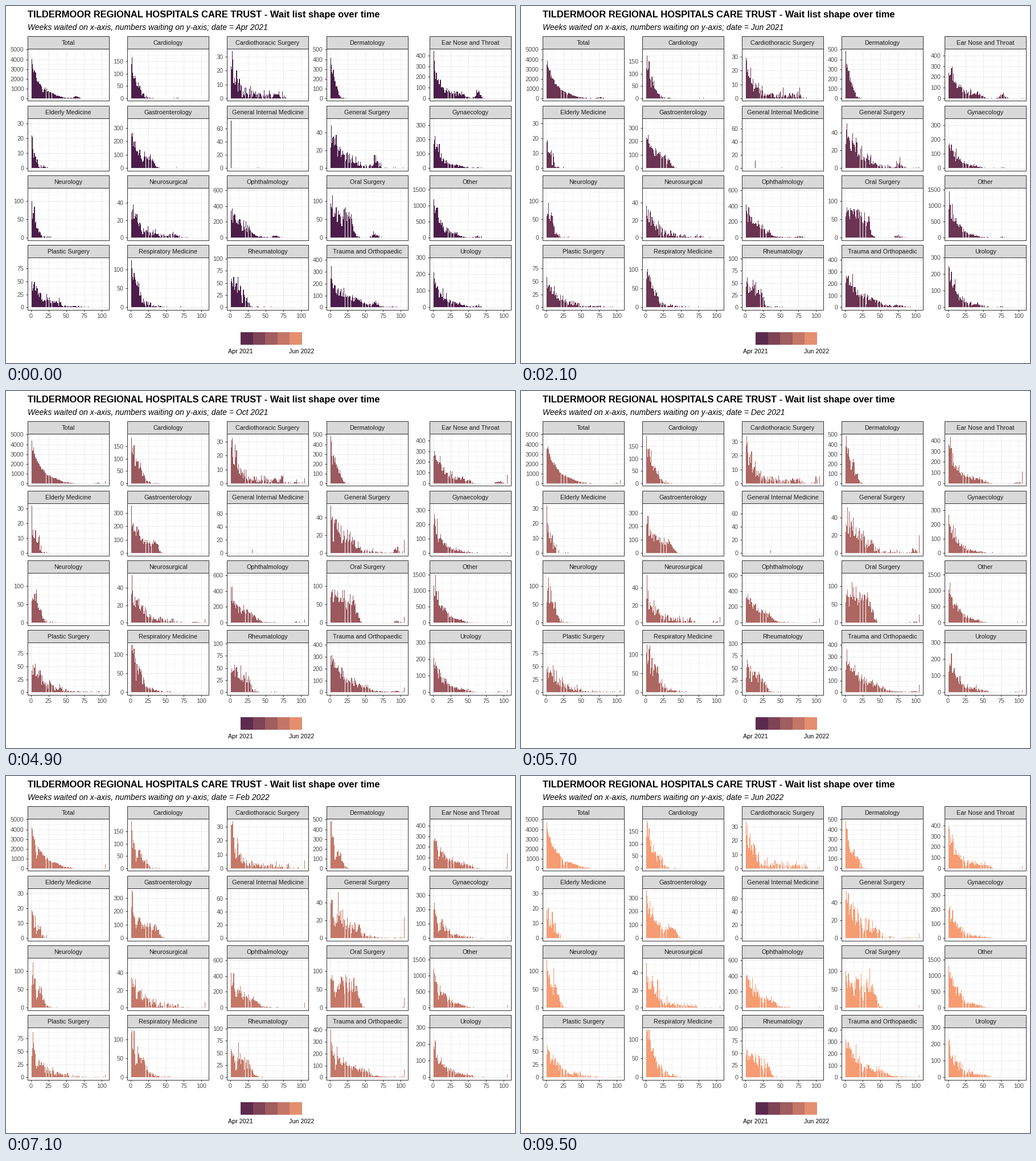
A matplotlib script for the animation above (10 s loop, 894x626 px).

```python
import numpy as np
import matplotlib.pyplot as plt
from matplotlib.animation import FuncAnimation
from matplotlib.collections import LineCollection, PolyCollection
from matplotlib.patches import Rectangle

W, H, DPI = 894, 626, 100
PX = 72 / DPI
PANEL_W, PANEL_TOP, PANEL_BOTTOM = 143.2, 87.4, 4.2   # above / below zero line
ROW_STEP, STRIP_TOP, STRIP_H, ZERO = 122, 53.4, 21.5, 162.3
X_UNIT, X_ZERO, PEAK_PX = 1.241, 5.85, 83.2
LOW, HIGH = np.array([76, 29, 75]) / 255, np.array([246, 156, 115]) / 255

NAMES = "Jan Feb Mar Apr May Jun Jul Aug Sep Oct Nov Dec".split()
MONTHS = [f"{NAMES[(m + 3) % 12]} {2021 + (m + 3) // 12}" for m in range(15)]
CHANGES = [700 * k for k in range(1, 11)] + [7000 + 600 * k for k in range(1, 5)]
WEEKS = np.arange(1, 106)
PER_MONTH = 4.35


def bell(x, mid, width):
    return np.exp(-((x - mid) / width) ** 2)


class Clinic:
    """A decaying queue plus a plateau that stops at a drifting week."""

    def __init__(self, name, step, peak, new=0, fade=1, flat=0, end=1, backlog=0):
        self.name, self.step, self.unit = name, step, PEAK_PX / peak
        self.new, self.fade, self.flat, self.end = new, fade, flat, end
        self.backlog = backlog

    def counts(self, month, rng):
        born = month * PER_MONTH - WEEKS
        end = self.end + .8 * month
        v = self.new * (1 + .25 * month / 14) * np.exp(-WEEKS / self.fade)
        v += self.flat / (1 + np.exp((WEEKS - end) / 2))
        # quiet holiday weeks and an older wave travel right with the cohorts
        v *= (1 - .6 * bell(born, 35.3, 1.5)) * (1 - .45 * bell(born, -17, 1.2))
        v += .45 * self.backlog * bell(born, -64, 5) * np.exp(-month / 6)
        n = rng.poisson(v * rng.lognormal(0, .18, len(v))).astype(float)
        # everyone past two years piles up in the last week
        n[-1] += round(self.backlog * bell(month, 9.5, 3.7) * (month > 1))
        return n


class OneCohort(Clinic):
    """A single group of patients that ages and shrinks."""

    def counts(self, month, rng):
        n = np.zeros(len(WEEKS))
        week = int(round(month * PER_MONTH))
        n[week] = self.new / (1 + 1.8 * month) if month < 10 else 0
        n[week + 38] = month < 7
        return n


CLINICS = [
    Clinic("Total", 1000, 4840),
    Clinic("Cardiology", 50, 190, 130, 7, 35, 15, 2),
    Clinic("Cardiothoracic Surgery", 10, 34, 28, 10, 2, 75, 6),
    Clinic("Dermatology", 100, 484, 400, 4.5, 120, 11),
    Clinic("Ear Nose and Throat", 100, 440, 300, 11, 35, 48, 130),
    Clinic("Elderly Medicine", 10, 32, 18, 4.5, 6, 6),
    Clinic("Gastroenterology", 100, 354, 220, 7, 80, 33, 4),
    OneCohort("General Internal Medicine", 20, 72, 72),
    Clinic("General Surgery", 20, 53, 34, 18, 6, 38, 22),
    Clinic("Gynaecology", 100, 333, 215, 12, 5, 48, 8),
    Clinic("Neurology", 50, 129, 40, 8, 50, 8),
    Clinic("Neurosurgical", 20, 54.5, 36, 13, 2, 60, 7),
    Clinic("Ophthalmology", 200, 598, 300, 14, 70, 32, 60),
    Clinic("Oral Surgery", 50, 130, 25, 10, 60, 33, 25),
    Clinic("Other", 500, 1486, 1100, 12, 50, 38, 70),
    Clinic("Plastic Surgery", 25, 91.6, 50, 16, 2, 45, 4),
    Clinic("Respiratory Medicine", 50, 125, 85, 12, 20, 13),
    Clinic("Rheumatology", 25, 97.6, 22, 10, 30, 23),
    Clinic("Trauma and Orthopaedic", 100, 400, 240, 20, 30, 50, 65),
    Clinic("Urology", 100, 287, 195, 12, 12, 48, 18),
]

plt.rcParams["font.family"] = "Liberation Sans"
fig = plt.figure(figsize=(W / DPI, H / DPI), dpi=DPI, facecolor="white")
ax = fig.add_axes([0, 0, 1, 1])
ax.set(xlim=(0, W), ylim=(H, 0))
ax.axis("off")


def label(x, y, s, px, color="black", ha="left", **kw):
    return ax.text(x, y, s, fontsize=px * PX, color=color, ha=ha,
                   va="baseline", zorder=6, **kw)


def lines(segs, color, z):
    ax.add_collection(LineCollection(segs, colors=color, linewidths=PX,
                                     zorder=z, snap=True))


def box(x, y, w, h, face="none", edge="none"):
    ax.add_patch(Rectangle((x, y), w, h, facecolor=face, edgecolor=edge,
                           linewidth=PX, zorder=4, snap=True))


def corner(k):
    """Left edge and zero line of panel k; the last column has wider labels."""
    row, col = divmod(k, 5)
    return 38 + 175 * col + 6 * (col == 4), ZERO + ROW_STEP * row


def shade(f):
    return LOW + (HIGH - LOW) * f


major, minor, ticks = [], [], []
for k, c in enumerate(CLINICS):
    left, y0 = corner(k)
    right, top, bottom = left + PANEL_W, y0 - PANEL_TOP, y0 + PANEL_BOTTOM
    for j in range(9):
        x = left + X_ZERO + 12.5 * j * X_UNIT
        (minor if j % 2 else major).append([(x, top), (x, bottom)])
        if k >= 15 and j % 2 == 0:
            ticks.append([(x, bottom), (x, bottom + 3)])
            label(x, bottom + 14.6, f"{25 * j // 2}", 10.8, "#4d4d4d", "center")
    for j, y in enumerate(np.arange(y0, top, -c.step * c.unit / 2)):
        (minor if j % 2 else major).append([(left, y), (right, y)])
        if j % 2 == 0:
            ticks.append([(left - 3, y), (left, y)])
            label(left - 6.5, y + 4, f"{c.step * j // 2}", 10.8, "#4d4d4d", "right")
    strip = STRIP_TOP + ROW_STEP * (k // 5)
    box(left, top, PANEL_W, PANEL_TOP + PANEL_BOTTOM, edge="#333333")
    box(left, strip, PANEL_W, STRIP_H, "#d9d9d9", "#333333")
    label(left + PANEL_W / 2, strip + 14.4, c.name, 10.9, "#1a1a1a", "center")

lines(minor, "#f3f3f3", 1)
lines(major, "#ebebeb", 2)
lines(ticks, "#333333", 4)

label(38, 20.3, "TILDERMOOR REGIONAL HOSPITALS CARE TRUST"
      " - Wait list shape over time", 16.5, weight="bold")
subtitle = label(38, 42, "", 13.9, style="italic")

for k in range(5):
    box(412 + 21.5 * k, 572, 21.5, 22, shade(.1 + .2 * k))
label(412, 609, MONTHS[0], 10.7, ha="center")
label(519, 609, MONTHS[-1], 10.7, ha="center")

bars = PolyCollection([], linewidths=0, antialiaseds=False, zorder=3)
ax.add_collection(bars)


def month_bars(month):
    rng = np.random.default_rng(40 + month)
    counts = [c.counts(month, rng) for c in CLINICS]
    counts[0] = sum(counts)
    parts = []
    for k, (c, n) in enumerate(zip(CLINICS, counts)):
        left, y0 = corner(k)
        on = n > 0
        mid = left + X_ZERO + WEEKS[on] * X_UNIT
        a, b = mid - .45 * X_UNIT, mid + .45 * X_UNIT
        base = np.full(len(mid), y0)
        tip = y0 - np.minimum(n[on] * c.unit, PEAK_PX)
        parts.append(np.stack([np.stack([a, b, b, a], 1),
                               np.stack([base, base, tip, tip], 1)], 2))
    return np.concatenate(parts)


SHAPES = [month_bars(m) for m in range(len(MONTHS))]


def draw(i):
    ms = i * 100
    month = sum(t <= ms for t in CHANGES)
    # for one step the new bars show under the old date
    turning = ms in CHANGES
    bars.set_verts(SHAPES[month])
    bars.set_facecolor(shade((month - .5 * turning) / 14))
    subtitle.set_text("Weeks waited on x-axis, numbers waiting on y-axis; "
                      f"date = {MONTHS[month - turning]}")
    return bars, subtitle


anim = FuncAnimation(fig, draw, frames=100, interval=100, repeat=True)
plt.show()
```
